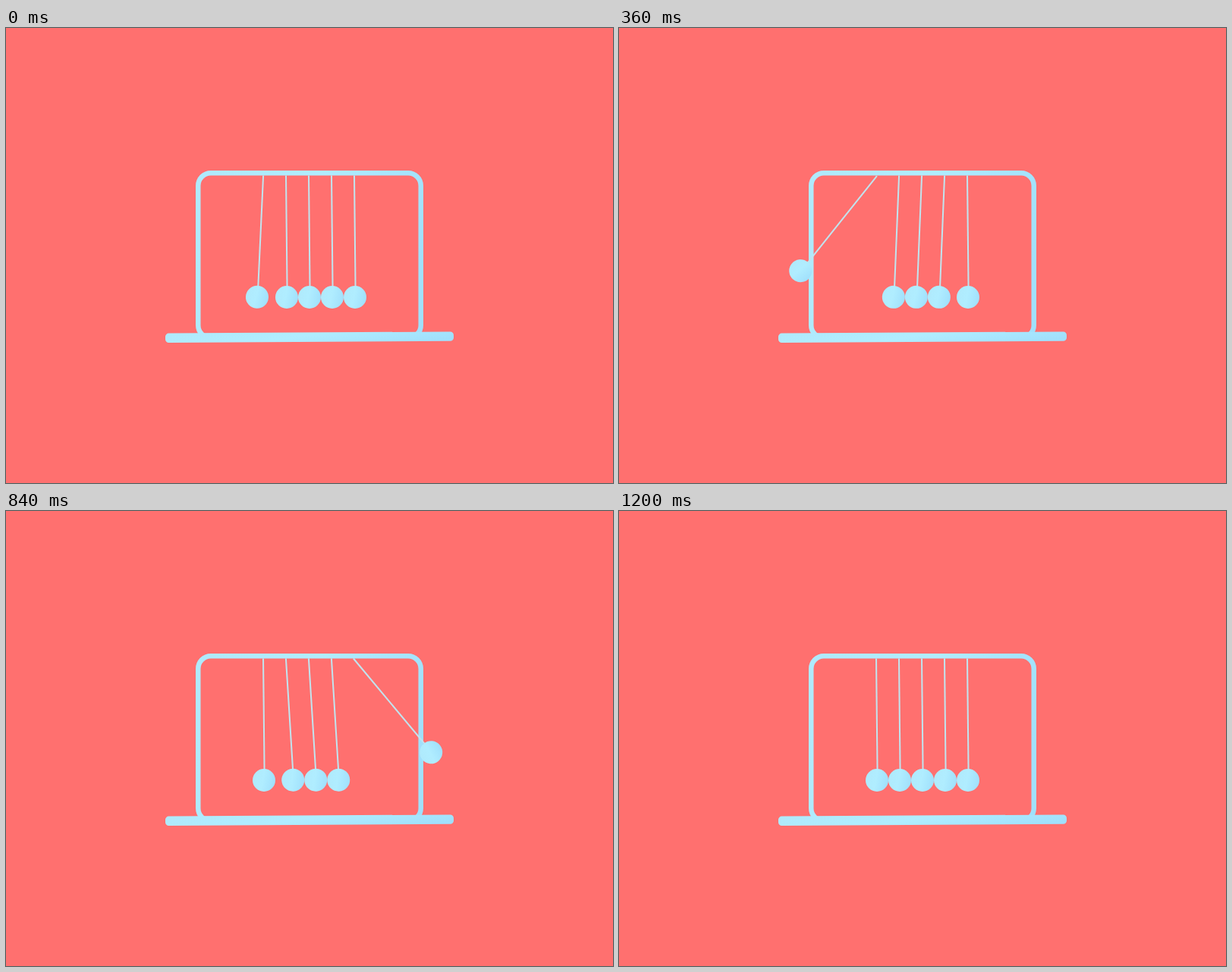
Recreate the animation shown at these times as an HTML page. Size 800 by 600 pixels, loop 1260 ms.

```html
<!DOCTYPE html>
<html lang="en">
<head>
<meta charset="utf-8">
<title>Swinging balls</title>
<style>
  html, body { margin: 0; width: 100%; height: 100%; overflow: hidden; background: #ff706f; }
  svg { display: block; width: 800px; height: 600px; }
</style>
</head>
<body>
<svg id="stage" viewBox="0 0 800 600">
  <defs>
    <linearGradient id="ice" x1="0" y1=".4" x2="1" y2=".6">
      <stop offset="0" stop-color="#afeafc"/>
      <stop offset=".45" stop-color="#b0edff"/>
      <stop offset="1" stop-color="#a0e0fc"/>
    </linearGradient>
  </defs>
  <rect x="253.25" y="191.25" width="293.5" height="217.5" rx="16.75"
        fill="none" stroke="url(#ice)" stroke-width="6.5"/>
  <rect x="210" y="401.5" width="380" height="12.4" rx="4.5"
        fill="url(#ice)" transform="rotate(-.33 400 407.7)"/>
</svg>
<script>
const SWING = 300, LOOP = 1260;
const OUTER_ANGLE = 40, INNER_ANGLE = 3.7;
const stage = document.getElementById('stage');

function add(parent, tag, attrs) {
  const node = document.createElementNS('http://www.w3.org/2000/svg', tag);
  for (const name in attrs) node.setAttribute(name, attrs[name]);
  return parent.appendChild(node);
}

const pendulums = [340, 370, 400, 430, 460].map(x => {
  const group = add(stage, 'g', {});
  add(group, 'line', { x1: x - 1, y1: 194.4, x2: x + .6, y2: 345, stroke: '#c1e4ef', 'stroke-width': 2 });
  add(group, 'circle', { cx: x, cy: 355, r: 15, fill: 'url(#ice)' });
  return { group, pivot: x - 1.4 };
});

function draw(now) {
  const t = Math.min(now % LOOP, 4 * SWING);
  const leftSide = t < 2 * SWING;
  const direction = leftSide ? 1 : -1;
  // Distance in time from the top of the current swing, 0 to 1
  const u = Math.min(1, Math.abs((leftSide ? t : t - 2 * SWING) / SWING - 1));
  const outer = OUTER_ANGLE * Math.sqrt(1 - u * u);
  const inner = INNER_ANGLE * (1 - u);
  const swinging = leftSide ? 0 : 4, resting = 4 - swinging;

  pendulums.forEach(({ group, pivot }, i) => {
    const angle = i === swinging ? outer : i === resting ? 0 : inner;
    group.setAttribute('transform', `rotate(${direction * angle} ${pivot} 196)`);
  });
}

function tick() {
  draw(performance.now());
  requestAnimationFrame(tick);
}
tick();
</script>
</body>
</html>
```
